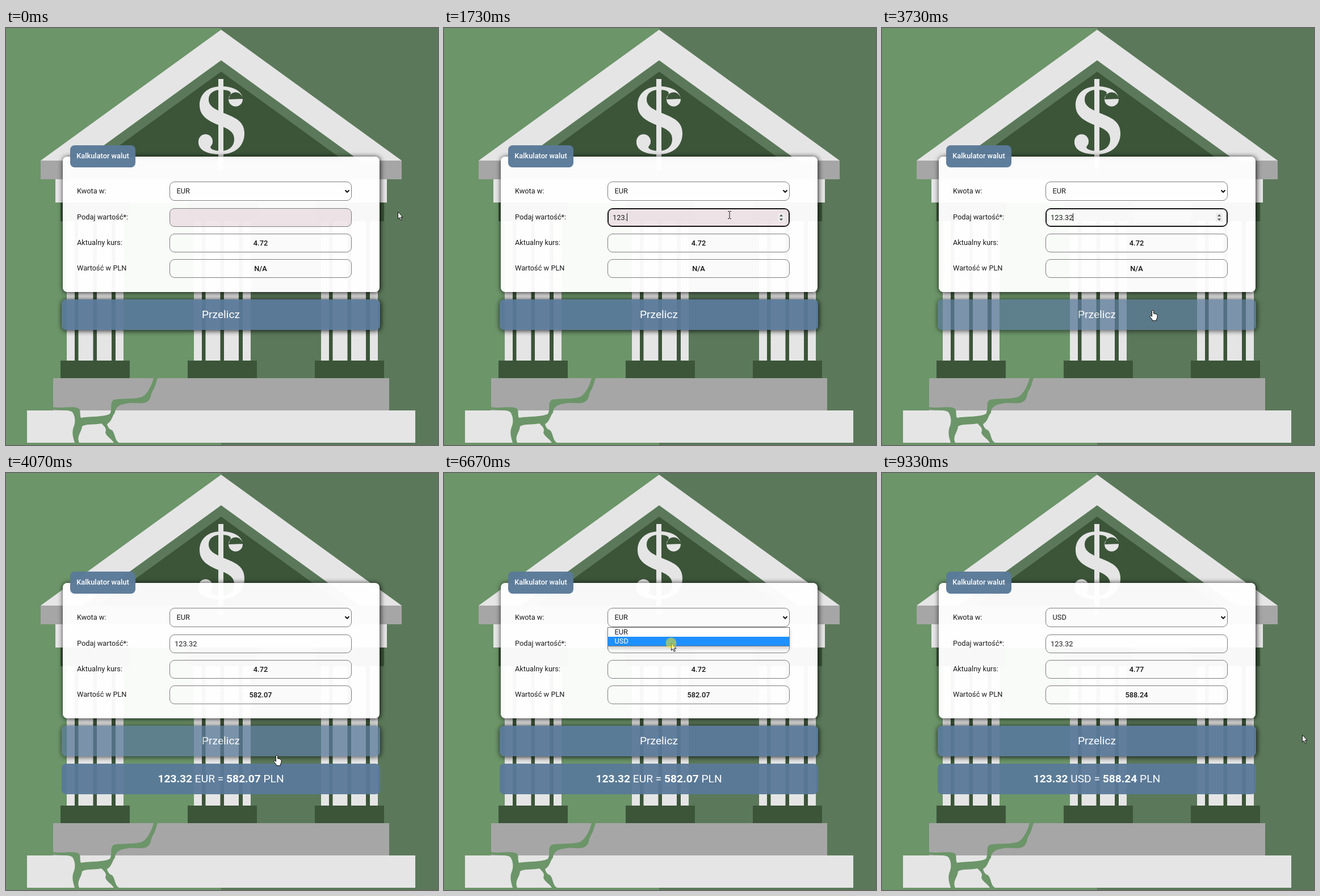
Write an HTML page with a canvas that moves like this. It is 761 px wide and 736 px high and loops after 9400 ms.

```html
<!DOCTYPE html>
<html lang="pl">
<head>
<meta charset="utf-8">
<title>Kalkulator walut</title>
<style>
html, body { margin: 0; width: 100%; height: 100%; overflow: hidden; }
body { position: relative; background: #6c9569; font: 12.8px Roboto, Arial, sans-serif; color: #1c1c1c; }
canvas { position: absolute; left: 0; top: 0; }
div, b.badge { position: absolute; box-sizing: border-box; white-space: pre; }
#form { left: 0; top: 0; width: 761px; height: 0; }
.panel { left: 100px; top: 227px; width: 558px; height: 239px; border-radius: 8px;
  background: rgba(255,255,255,.96); box-shadow: 1px 1px 8px 1px rgba(0,0,0,.75); }
.badge { left: 113px; top: 207px; width: 115px; height: 39px; line-height: 38px; border-radius: 8px;
  text-align: center; color: #fff; font-weight: 500; background: rgba(90,122,153,.97); }
.label { left: 125px; height: 32px; line-height: 32px; }
.field { left: 288px; width: 321px; height: 33px; line-height: 31px; border: 1px solid #7d7d7d; border-radius: 9px; }
.out { text-align: center; font-weight: 500; color: #111; }
.focus { box-shadow: inset 0 0 0 1px #111; border-color: #111; }
.bar { left: 98px; width: 561px; height: 54px; line-height: 54px; border-radius: 8px; text-align: center;
  font-size: 19.2px; color: #fff; background: rgba(90,122,153,.95); }
.bar b { font-weight: 700; }
#btn { top: 479px; box-shadow: 1px 1px 8px 1px rgba(0,0,0,.75); }
#result { top: 513px; }
#caret { top: 327px; width: 1px; height: 14px; background: #111; }
#list { left: 288px; top: 305px; width: 321px; height: 34px; border: 1px solid #777; background: #fff;
  box-shadow: 0 3px 6px rgba(0,0,0,.2); }
#list div { left: 0; width: 319px; height: 16px; line-height: 16px; padding-left: 11.5px; }
#list .on { background: #1e90ff; color: #fff; }
svg { position: absolute; }
</style>
</head>
<body>
<canvas id="scene" width="761" height="736"></canvas>
<div id="form">
  <div class="panel"></div>
  <b class="badge">Kalkulator walut</b>
  <div class="label" style="top:272px">Kwota w:</div>
  <div class="label" style="top:317.5px">Podaj wartość*:</div>
  <div class="label" style="top:363px">Aktualny kurs:</div>
  <div class="label" style="top:408px">Wartość w PLN</div>
  <div class="field" id="select" style="top:271px;height:34px;line-height:32px;padding-left:11.5px"><span id="code">EUR</span><svg style="left:307px;top:12px" width="10" height="9"><path d="M1.5 2.2 5 5.8 8.500 2.200" fill="none" stroke="#111" stroke-width="2"/></svg></div>
  <div class="field" id="input" style="top:318px;padding-left:8px"><span id="typed"></span><svg id="spin" style="left:298px;top:8px" width="14" height="15"><path d="M1 0H13V15H1Z" fill="#ececec"/><path d="M4 5.500 7 2 10 5.500ZM4 9.500 7 13 10 9.500Z" fill="#4a4a4a"/></svg></div>
  <div class="field out" id="rate" style="top:363px"></div>
  <div class="field out" id="value" style="top:408px"></div>
  <div id="caret"></div>
  <div class="bar" id="btn">Przelicz</div>
  <div id="list"><div id="optEur" style="top:0">EUR</div><div id="optUsd" style="top:16px">USD</div></div>
</div>
<div class="bar" id="result"><b>123.32</b> <span id="resCode"></span> = <b id="resValue"></b> PLN</div>
<canvas id="pointer" width="761" height="736"></canvas>
<script>
const $ = id => document.getElementById(id);
const LOOP = 9400;
const LIGHT = '#e5e5e5', GREY = '#a6a6a6', DARK = '#3c5539', LEFT = '#6c9569', RIGHT = '#5b795a';

function drawScene(c) {
  const rect = (color, x0, y0, x1, y1) => { c.fillStyle = color; c.fillRect(x0, y0, x1 - x0, y1 - y0); };
  const gable = (color, apex) => {
    const half = (234 - apex) * 318 / 231;
    c.fillStyle = color;
    c.beginPath();
    c.moveTo(379, apex); c.lineTo(379 + half, 234); c.lineTo(379 - half, 234);
    c.fill();
  };
  const shape = (color, d) => { c.fillStyle = color; c.fill(new Path2D(d)); };

  rect(LEFT, 0, 0, 379, 736);
  rect(RIGHT, 379, 0, 761, 736);
  gable(LIGHT, 3);
  gable(RIGHT, 57);
  gable(DARK, 77);
  rect(GREY, 61, 234, 697, 267);
  rect(LIGHT, 87, 267, 671, 308);
  for (const x of [107, 331, 555]) {
    rect(DARK, x - 11, 308, x + 111, 341);
    rect(DARK, x, 341, x + 100, 587);
    for (const [a, b] of [[0, 14], [20.500, 46.500], [53, 79], [86, 100]]) rect(LIGHT, x + a, 341, x + b, 587);
    rect(DARK, x - 11, 587, x + 111, 618);
  }
  rect(GREY, 83, 618, 675, 675);
  rect(LIGHT, 37, 675, 721, 732);

  // dollar sign
  rect(LIGHT, 374, 90, 383, 250);
  shape(LIGHT, 'M417 125C416 111 400 103 379 103C355 103 341 117 341 136C341 155 356 164 374 171' +
    'C393 178 402 184 402 196C402 210 392 217 378 217C368 217 360 214 360 210L364 203' +
    'L339 200C338 216 355 223 378 223C404 223 420 208 420 186C420 166 406 159 386 151' +
    'C367 143 357 138 357 126C357 115 366 109 379 109C388 109 396 111 396 115L392 126Z' +
    'M417 126A12.500 12.500 0 1 1 392 126A12.500 12.500 0 1 1 417 126Z');
  shape(LIGHT, 'M364 200A12.500 12.500 0 1 1 339 200A12.500 12.500 0 1 1 364 200Z');

  // crack
  shape(LEFT, 'M260 618C256 632 250 645 240 651C225 656 205 653 190 656C182 661 188 673 183 681' +
    'C171 687 150 685 132 688C129 682 133 674 127 671C115 667 100 672 83 669V673' +
    'C97 676 111 673 117 678C121 684 123 693 120 702C115 713 118 722 121 732H129' +
    'C124 720 133 714 134 703C142 698 156 701 168 698C174 704 178 707 175 714' +
    'C177 721 185 724 190 732H199C191 727 193 717 187 710C181 708 179 703 178 699' +
    'C187 694 187 684 192 679C192 669 201 664 212 663C224 660 236 664 246 661' +
    'C257 656 254 648 258 641C263 634 264 626 267 618Z');
}

// pointer moves: start, end, steps, from, to
const moves = [
  [130, 610, 7, [690, 324], [503, 330]],
  [3180, 3730, 8, [503, 330], [477, 498]],
  [5180, 5600, 7, [477, 498], [392, 263]],
  [6200, 6410, 4, [392, 263], [400, 300]],
  [6800, 7210, 6, [400, 300], [436, 488]],
  [8980, 9330, 6, [436, 488], [740, 462]]
];
const clicks = [[540, 610], [3930, 4000], [5800, 5870], [6670, 6800], [7600, 7670]];
const keys = [[1070, '1'], [1270, '12'], [1470, '123'], [1730, '123.'], [2390, '123.3'], [2590, '123.32']];
const hover = [[3520, 0], [3730, 1], [4070, 1], [4140, 0], [5180, 0], [5250, .6], [5390, 0],
  [7070, 0], [7210, 1], [9050, 1], [9260, 0]];

const within = (t, a, b) => t >= a && t < b;

function pointerAt(t) {
  let pos = moves[0][3];
  for (const [a, b, n, from, to] of moves) {
    if (t < a) break;
    const p = Math.min(1, (Math.floor((t - a) / (b - a) * (n - 1) + 1e-6) + 1) / n);
    const e = p * p * (3 - 2 * p);
    pos = from.map((v, i) => v + (to[i] - v) * e);
  }
  return pos;
}

function hoverAt(t) {
  const i = hover.findIndex(k => t < k[0]);
  if (i <= 0) return 0;
  const [a, u] = hover[i - 1], [b, v] = hover[i];
  return u + (v - u) * (t - a) / (b - a);
}

const arrow = new Path2D('M.5 .5V13L3.300 10.500 5.300 15.300 7.300 14.400 5.300 9.800H9Z');
const hand = new Path2D('M-1.500 1.200Q0-.6 1.500 1.200V6L4 6.300 6 7 8 8.300V13L6.500 16V18.500H-1V16.500' +
  'L-5 11.500Q-5 9-3.500 9.500L-1.500 11.300Z');
const beam = new Path2D('M-3-6.500H-1L0-5.500 1-6.500H3M0-5.500V5.500M-3 6.500H-1L0 5.500 1 6.500H3');

function drawPointer(c, t, [x, y], lift) {
  c.clearRect(0, 0, 761, 736);
  const inX = x > 98 && x < 659, btnY = 479 - lift;
  const text = !lift && x > 288 && x < 609 && y > 317 && y < 351;
  const link = inX && y > btnY && y < btnY + 54 || within(t, 4000, 4140);
  c.save();
  c.translate(x, y);
  c.lineWidth = 1;
  c.strokeStyle = '#111';
  c.fillStyle = '#fff';
  if (text) c.stroke(beam);
  else {
    const path = link ? hand : arrow;
    c.fill(path);
    c.stroke(path);
  }
  if (clicks.some(([a, b]) => within(t, a, b))) {
    c.fillStyle = 'rgba(255,238,0,.5)';
    c.beginPath();
    c.arc(0, 0, 9.500, 0, 7);
    c.fill();
  }
  c.restore();
  return text;
}

const show = (id, on) => { $(id).style.visibility = on ? 'visible' : 'hidden'; };
const pen = $('pointer').getContext('2d');

function render(t) {
  const done = t >= 4000, usd = t >= 6800, again = t >= 7600;
  const lift = done ? 33 : 0;
  const typed = keys.reduce((s, [at, text]) => t >= at ? text : s, '');
  const focus = within(t, 540, 3930);
  const overText = drawPointer(pen, t, pointerAt(t), lift);

  $('form').style.transform = `translateY(${-lift}px)`;
  $('typed').textContent = typed;
  $('input').style.background = t < 1070 || within(t, 1730, 2390) ? 'rgba(217,190,199,.4)' : 'none';
  $('input').classList.toggle('focus', focus);
  show('spin', focus || overText);
  show('caret', focus && !within(t, 1000, 1070) && !within(t, 2190, 2390) && !within(t, 3180, 3660));
  $('caret').style.left = Math.round(297 + $('typed').offsetWidth) + 'px';

  $('select').classList.toggle('focus', within(t, 6800, 7600));
  $('code').textContent = usd ? 'USD' : 'EUR';
  $('rate').textContent = usd ? '4.77' : '4.72';
  $('value').textContent = again ? '588.24' : done ? '582.07' : 'N/A';
  show('list', within(t, 5800, 6800));
  $('optEur').className = t < 6340 ? 'on' : '';
  $('optUsd').className = t < 6340 ? '' : 'on';

  $('btn').style.opacity = 1 - .2 * hoverAt(t);
  show('result', done);
  $('resCode').textContent = again ? 'USD' : 'EUR';
  $('resValue').textContent = again ? '588.24' : '582.07';
}

drawScene($('scene').getContext('2d'));
const start = performance.now();
function tick() {
  render((performance.now() - start) % LOOP);
  requestAnimationFrame(tick);
}
tick();
</script>
</body>
</html>
```
